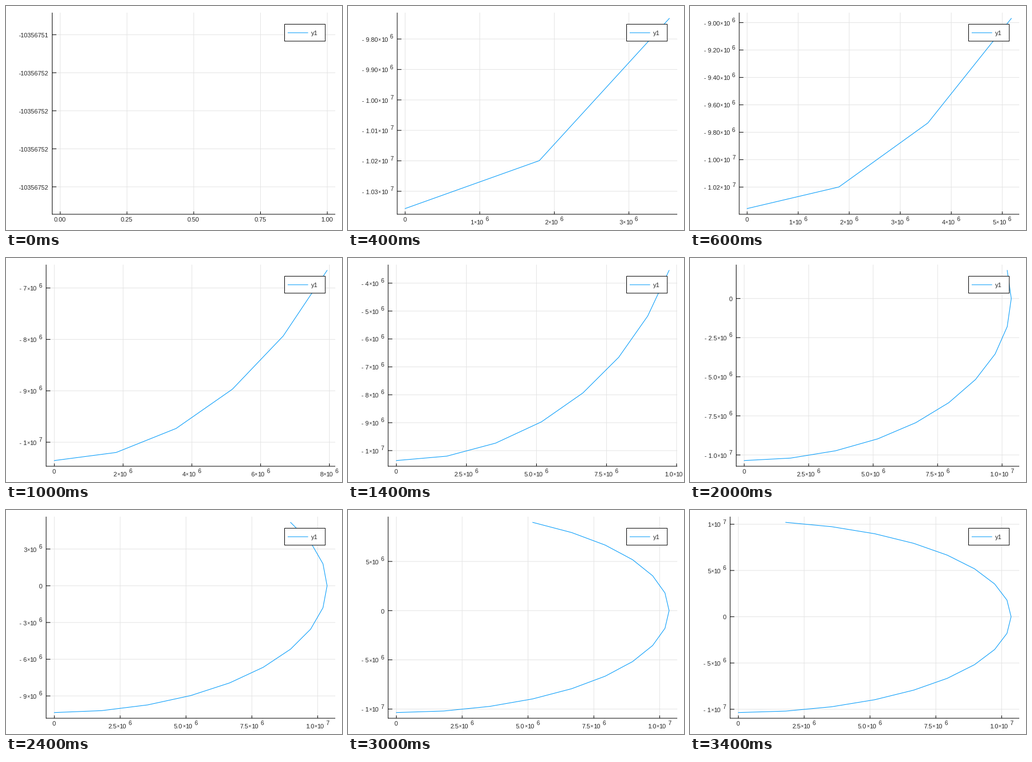
A matplotlib script that plays this animation: 600 px wide and 400 px high, repeating every 3.6 s.

```python
import math

import numpy as np
import matplotlib.pyplot as plt
from matplotlib.animation import FuncAnimation
from matplotlib.patches import Rectangle

W, H, DPI = 600, 400, 100
TOP, BOTTOM, RIGHT = 11.9, 371.9, 588
FRAMES, INTERVAL = 18, 200
RADIUS = 10356752.3142
STEP = math.radians(10)

BLUE = "#009afa"
INK = "#242424"
GRID = "#e4e4e4"
PT = 72 / DPI
FONT = 11.1       # text sizes in pixels
TIMES = 8.6
SUPER = 10.5
SUPER_GAP = 4
SUPER_RISE = 5.5

# step multiples with their niceness
NICE = ((1, 1.0), (5, 0.9), (2.5, 0.5), (2, 0.7), (3, 0.2))
ADVANCE = {".": 0.278, " ": 0.278, "-": 0.333, "×": 0.584}

fig = plt.figure(figsize=(W / DPI, H / DPI), dpi=DPI, facecolor="white")
ax = fig.add_axes([0, 0, 1, 1])
ax.set_xlim(0, W)
ax.set_ylim(H, 0)
ax.axis("off")
artists = []


def segment(x0, y0, x1, y1, color, z):
    line, = ax.plot([x0, x1], [y0, y1], color=color, lw=PT, zorder=z,
                    solid_capstyle="butt", snap=False)
    return line


def write(x, mid, text, size=FONT, z=4):
    """Left-aligned text whose digits are centred on height mid."""
    return ax.text(x, mid + 0.36 * size, text, size=size * PT, color=INK,
                   family="Liberation Sans", va="baseline", ha="left", zorder=z)


def limits(values):
    lo, hi = min(values), max(values)
    if hi == lo:
        hi = lo + 1
    pad = 0.03 * (hi - lo)
    return lo - pad, hi + pad


def find_ticks(lo, hi):
    """Pick the tick set with the best mix of count, coverage and niceness."""
    span = hi - lo
    order = math.floor(math.log10(span))
    best, best_score = [], -math.inf
    for power in (order, order - 1):
        for q, nice in NICE:
            step = q * 10.0 ** power
            first, last = math.ceil(lo / step), math.floor(hi / step)
            count = last - first + 1
            if not 4 <= count <= 8:
                continue
            score = (0.25 * (1 - abs(count - 5) / 5)
                     + (lo <= 0 <= hi) / 6
                     + 0.5 * span / ((count - 1) * step)
                     + 0.25 * nice)
            if score > best_score + 1e-9:
                best_score = score
                best = [r * step for r in range(first, last + 1)]
    return best


def decimals(v):
    return len(f"{v:.8g}".partition(".")[2])


def make_labels(ticks):
    """Return (mantissa, exponent) pairs; exponent is None for plain numbers."""
    if ticks[-1] - ticks[0] < 1e4:
        places = max(decimals(v) for v in ticks)
        return [(f"{v:.{places}f}", None) for v in ticks]
    parts = [f"{v:.6e}".split("e") for v in ticks]
    places = max(decimals(float(m)) for m, _ in parts)
    return [(f"{float(m):.{places}f}", str(int(e))) if v else ("0", None)
            for v, (m, e) in zip(ticks, parts)]


def label_length(label):
    mantissa, exponent = label
    return len(mantissa) + (len("×10^") + len(exponent) if exponent else 0)


def left_edge(labels):
    """The plot starts further right the longer its y labels are."""
    return 33.9 + 5.4 * max(label_length(s) for s in labels)


def pieces(label):
    """Split a label into (text, size, advance, rise)."""
    mantissa, exponent = label

    def piece(text, size=FONT, rise=0):
        width = size * sum(ADVANCE.get(c, 0.556) for c in text)
        return text, size, width, rise

    if exponent is None:
        return [piece(mantissa)]
    return [piece(mantissa.replace("-", "- ")), piece("×", TIMES),
            piece("10"), ("", FONT, SUPER_GAP, 0),
            piece(exponent, SUPER, SUPER_RISE)]


def draw_label(label, x, mid, align):
    """Place a label so that the fraction align of its width lies left of x."""
    parts = pieces(label)
    x -= align * sum(p[2] for p in parts)
    for text, size, width, rise in parts:
        if text:
            artists.append(write(x, mid - rise, text, size))
        x += width


def draw(frame):
    while artists:
        artists.pop().remove()

    angle = STEP * np.arange(frame + 1)
    xs, ys = RADIUS * np.sin(angle), -RADIUS * np.cos(angle)
    (x0, x1), (y0, y1) = limits(xs), limits(ys)
    xticks, yticks = find_ticks(x0, x1), find_ticks(y0, y1)
    xlabels, ylabels = make_labels(xticks), make_labels(yticks)
    left = left_edge(ylabels)

    def to_x(v):
        return left + (v - x0) / (x1 - x0) * (RIGHT - left)

    def to_y(v):
        return BOTTOM - (v - y0) / (y1 - y0) * (BOTTOM - TOP)

    for v, label in zip(xticks, xlabels):
        x = to_x(v)
        artists.append(segment(x, TOP, x, BOTTOM, GRID, 1))
        artists.append(segment(x, BOTTOM - 5, x, BOTTOM, "black", 3))
        draw_label(label, x - 0.5, 386 if label[1] else 381.3, 0.5)
    for v, label in zip(yticks, ylabels):
        y = to_y(v)
        artists.append(segment(left, y, RIGHT, y, GRID, 1))
        artists.append(segment(left, y, left + 7.5, y, "black", 3))
        draw_label(label, left - 7.1, y + 0.9, 1)

    artists.append(segment(left, TOP, left, BOTTOM + 0.5, "black", 3))
    artists.append(segment(left, BOTTOM, RIGHT, BOTTOM, "black", 3))
    if frame:
        artists.extend(ax.plot(to_x(xs), to_y(ys), color=BLUE, lw=PT * 1.05,
                               solid_joinstyle="round", zorder=2))
    return artists


def draw_legend():
    ax.add_patch(Rectangle((497.5, 32.6), 72.6, 30.2, fc="white", ec="black",
                           lw=PT, zorder=5, snap=False))
    segment(503, 47.8, 539.5, 47.8, BLUE, 6)
    write(545, 48, "y1", z=6)


draw_legend()
anim = FuncAnimation(fig, draw, frames=FRAMES, init_func=lambda: artists,
                     interval=INTERVAL, repeat=True, repeat_delay=0, blit=False)
plt.show()
```
